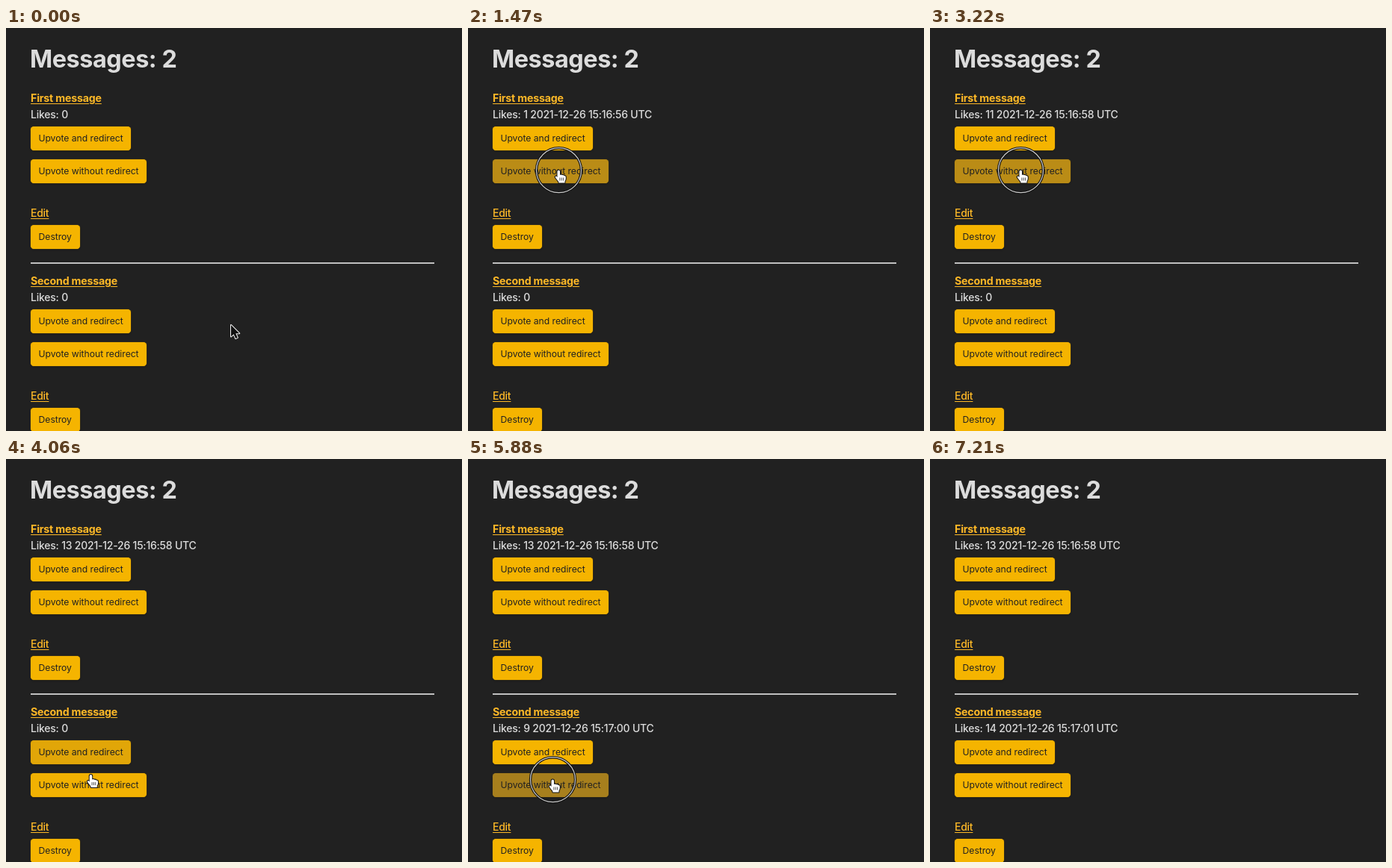
An HTML page with a canvas that plays this animation: 610x540 px, repeating every 7350 ms.

```html
<!DOCTYPE html>
<html lang="en">
<head>
<meta charset="utf-8">
<title>Messages</title>
<style>
  html, body { margin: 0; width: 100%; height: 100%; overflow: hidden; background: #212121; }
  #stage {
    position: relative; width: 610px; height: 540px; overflow: hidden;
    background: #212121; color: #dcdcdc;
    font: 500 14px/22px Inter, sans-serif; letter-spacing: -0.018em;
  }
  #stage > *, section > * { position: absolute; white-space: nowrap; }
  h1 { margin: 0; left: 32px; top: 17px; font: 700 32.4px/50px Inter, sans-serif; letter-spacing: -0.014em; }
  section { left: 33px; width: 540px; height: 232px; }
  .link { left: 0; color: #fdb827; text-decoration: underline; text-underline-offset: 2px; text-decoration-thickness: 1.3px; }
  .title { top: 0.5px; font-size: 14.2px; font-weight: 700; letter-spacing: -0.014em; }
  .likes { top: 22.5px; letter-spacing: -0.016em; }
  .edit { top: 154.5px; }
  .btn {
    --fill: rgb(245, 180, 0);
    left: 0; height: 32px; border-radius: 4.5px; background: var(--fill); color: #212121;
    font-size: 12.2px; font-weight: 400; line-height: 32px; letter-spacing: -0.003em; text-align: center;
    box-shadow: 0 0 1px var(--fill), 0 1px 3px rgba(0, 0, 0, .3);
  }
  .redirect { top: 50px; width: 134px; }
  .stay { top: 94px; width: 155px; }
  .destroy { top: 182px; width: 65.5px; }
  hr { margin: 0; border: 0; left: 33px; top: 314px; width: 540px; height: 2px; background: #c0c0c0; }
  canvas { left: 0; top: 0; }
</style>
</head>
<body>
<div id="stage">
  <h1>Messages: 2</h1>
  <hr>
</div>
<script>
const LOOP = 7350, STEP = 70, FADE = 150;
const BRIGHT = [245, 180, 0], DIM = [163, 124, 31];
const stage = document.getElementById('stage');

function add(parent, tag, cls, text = '') {
  const el = document.createElement(tag);
  el.className = cls;
  el.textContent = text;
  parent.append(el);
  return el;
}

function makeMessage(title, top, dim, clicks) {
  const box = add(stage, 'section', '');
  box.style.top = top + 'px';
  add(box, 'div', 'link title', title);
  const likes = add(box, 'div', 'likes', 'Likes: 0');
  const redirect = add(box, 'div', 'btn redirect', 'Upvote and redirect');
  const stay = add(box, 'div', 'btn stay', 'Upvote without redirect');
  add(box, 'div', 'link edit', 'Edit');
  add(box, 'div', 'btn destroy', 'Destroy');
  return {
    likes, clicks, top,
    buttons: [
      { el: redirect, y: top + 50, w: 134 },
      { el: stay, y: top + 94, w: 155, clicks, dim }
    ]
  };
}

// Click rhythm: [time, likes so far]
const messages = [
  makeMessage('First message', 82, .72, [[1250, 0], [1450, 1], [2388, 6], [3540, 13]]),
  makeMessage('Second message', 327, .95, [[4270, 0], [4410, 1], [5015, 5], [5835, 9], [6640, 14]])
];

const canvas = add(stage, 'canvas', '');
const scale = window.devicePixelRatio || 1;
canvas.width = 610 * scale;
canvas.height = 540 * scale;
canvas.style.width = '610px';
canvas.style.height = '540px';
const ctx = canvas.getContext('2d');

// Pointer path: [time, x, y]
const path = [
  [0, 301, 398], [420, 289, 381], [560, 289, 381], [1150, 121, 191],
  [3600, 121, 191], [4110, 113, 430], [6690, 113, 430], [7210, 274, 546]
];

const smooth = k => k * k * (3 - 2 * k);

function along(keys, t, ease = k => k) {
  if (t <= keys[0][0]) return keys[0].slice(1);
  const i = keys.findIndex(k => k[0] > t);
  if (i < 0) return keys[keys.length - 1].slice(1);
  const a = keys[i - 1], b = keys[i];
  const k = ease((t - a[0]) / (b[0] - a[0]));
  return a.slice(1).map((v, j) => v + (b[j + 1] - v) * k);
}

const pointerAt = t => along(path, t, smooth);
const isActive = (keys, t) => t >= keys[0][0] && t < keys[keys.length - 1][0];
const inside = (x, y, left, top, w, h) => x >= left && x <= left + w && y >= top && y <= top + h;

function dimTarget(b, t) {
  if (b.clicks && isActive(b.clicks, t)) return b.dim;
  const [x, y] = pointerAt(t);
  return inside(x, y, 33, b.y, b.w, 32) ? .5 : 0;
}

// A linear transition equals the mean of the recent targets.
function dimLevel(b, t) {
  const n = 10;
  let sum = 0;
  for (let i = 0; i < n; i++) sum += dimTarget(b, Math.max(0, t - FADE * i / n));
  return sum / n;
}

function fillAt(level) {
  return `rgb(${BRIGHT.map((v, i) => Math.round(v + (DIM[i] - v) * level))})`;
}

function stamp(t) {
  const s = 56 + Math.floor((t - 1200) / 1000);
  const two = n => String(n).padStart(2, '0');
  return `2021-12-26 15:${two(16 + Math.floor(s / 60))}:${two(s % 60)} UTC`;
}

// Time at which the given like count was reached
function reachedAt(keys, count) {
  return along(keys.map(([t, n]) => [n, t]), count)[0];
}

function outline(p, fill, edge, width) {
  ctx.lineJoin = 'round';
  ctx.strokeStyle = edge;
  ctx.lineWidth = width;
  ctx.stroke(p);
  ctx.fillStyle = fill;
  ctx.fill(p);
}

const arrow = new Path2D('M0 0V15.5L3.6 12.2L6.2 18L8.8 16.9L6.3 11.2H11.2Z');
const hand = new Path2D('M-2 1.5Q-2 -.5 -.2 -.5Q1.5 -.5 1.5 1.5V6Q3 5 4.5 6.3Q6 5.6 7 7Q9.3 6.6 9.3 9V11Q9 13 8 14.5V16.5H0L-.5 14.6Q-2 13 -4.5 9.5Q-5.3 8 -4 7.4Q-3 7.2 -2 9Z');
const knuckles = new Path2D('M1.4 9.5V13.5M3.7 9.5V13.5M6 9.5V13.5');
const ban = new Path2D('M17 22a7.3 7.3 0 1 1 -14.6 0a7.3 7.3 0 1 1 14.6 0M4.6 16.9L14.8 27.1');

function ring(x, y) {
  for (const [color, width] of [['#111', 3.4], ['#ccc', 1.2]]) {
    ctx.beginPath();
    ctx.arc(x, y, 30, 0, Math.PI * 2);
    ctx.strokeStyle = color;
    ctx.lineWidth = width;
    ctx.stroke();
  }
}

function drawPointer(t) {
  ctx.setTransform(scale, 0, 0, scale, 0, 0);
  ctx.clearRect(0, 0, 610, 540);
  const [x, y] = pointerAt(t);
  if (y > 541) return;

  let blocked = false;
  for (const m of messages) {
    if (!isActive(m.clicks, t)) continue;
    const phase = along(m.clicks, t)[0] % 1;
    blocked = phase > .7;
    if (phase < .4) ring(x + .5, y - .3);
  }
  const overLink = messages.some(m => inside(x, y, 33, m.top + 2, m.top > 200 ? 115 : 95, 18));
  const overButton = messages.some(m => m.buttons.some(b => inside(x, y, 33, b.y, b.w, 32)));

  ctx.translate(x, y);
  if (blocked) {
    ctx.translate(0, -2.5);
    for (const [color, width] of [['#222', 4.2], ['#f2f2f2', 2.4]]) {
      ctx.strokeStyle = color;
      ctx.lineWidth = width;
      ctx.stroke(ban);
    }
    outline(arrow, '#111', '#f2f2f2', 1.8);
  } else if (overLink || overButton) {
    ctx.translate(.5, 0);
    outline(hand, '#fff', '#111', 2);
    ctx.strokeStyle = '#222';
    ctx.lineWidth = .8;
    ctx.stroke(knuckles);
  } else {
    outline(arrow, '#111', '#f2f2f2', 2);
  }
}

function render(t) {
  for (const m of messages) {
    const count = Math.floor(along(m.clicks, t)[0] + 1e-6);
    const text = count ? `Likes: ${count} ${stamp(reachedAt(m.clicks, count))}` : 'Likes: 0';
    if (m.likes.textContent !== text) m.likes.textContent = text;
    for (const b of m.buttons) b.el.style.setProperty('--fill', fillAt(dimLevel(b, t)));
  }
  drawPointer(t);
}

const start = performance.now();
function tick() {
  const t = (performance.now() - start) % LOOP;
  render(Math.floor(t / STEP) * STEP);
  requestAnimationFrame(tick);
}
tick();
</script>
</body>
</html>
```
